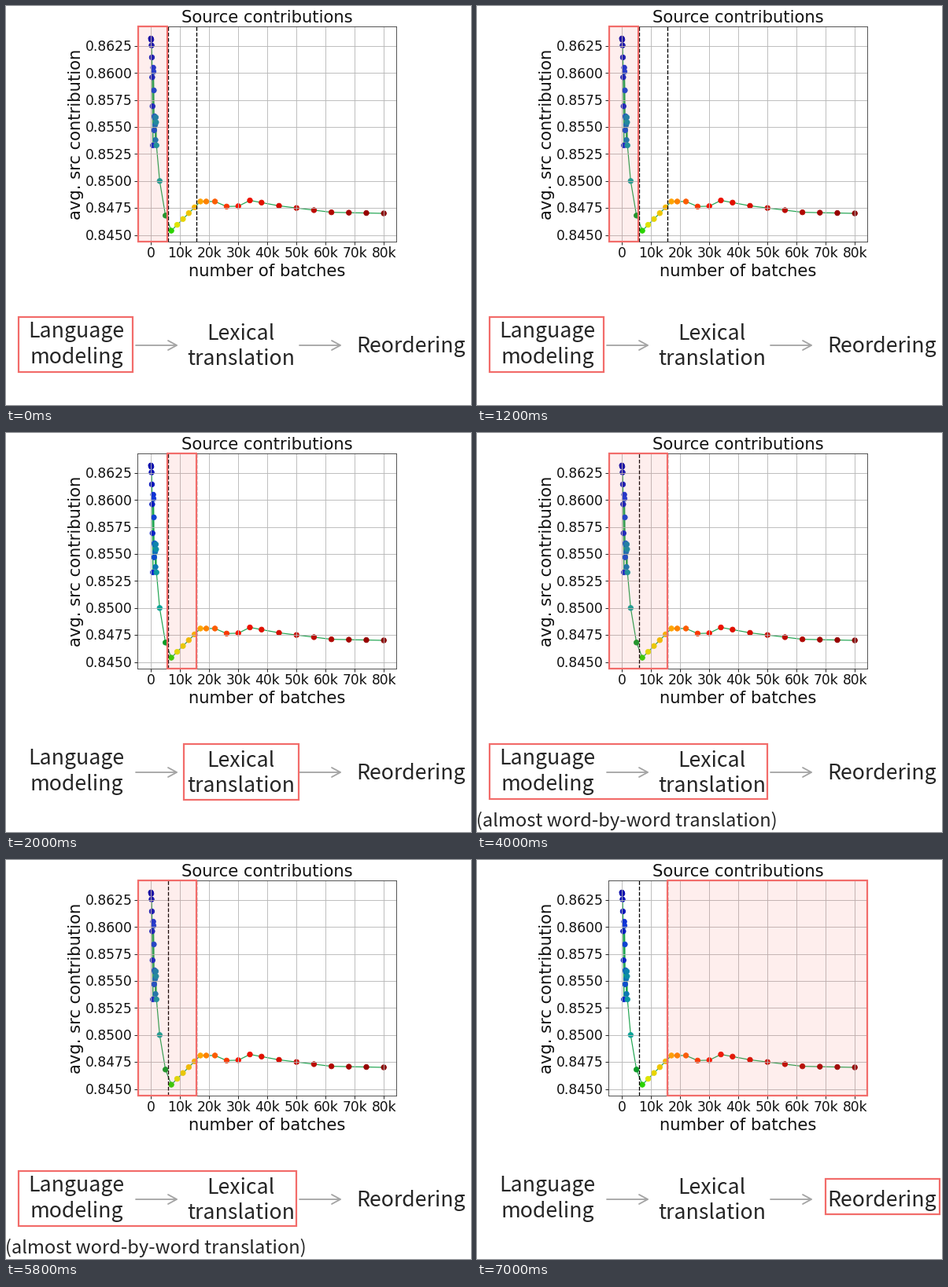
Write a matplotlib script that moves like this. It is 591x508 px and loops after 9000 ms.

```python
import numpy as np
import matplotlib.pyplot as plt
from matplotlib.animation import FuncAnimation
from matplotlib.colors import LinearSegmentedColormap
from matplotlib.patches import Rectangle

W, H, DPI = 591, 508, 100
PT = 72 / DPI  # points per pixel
RED, SHADE, ARROW = "#f26c6a", (0.97, 0.4, 0.38, 0.11), "#a3a3a3"
PLOT, HAND = "DejaVu Sans", "Noto Sans CJK JP"

# Plot area in pixels, measured from the top left
LEFT, RIGHT, TOP, BOTTOM = 167.4, 496.3, 26.1, 300.3
X0, PX_PER_K = 184.2, 3.7
Y0, V0, ROW, STEP = 51, 0.8625, 34.36, 0.0025

# Early checkpoints: passes that fall from high to low in a number of points
PASSES = [(.8632, .8533, 7), (.8605, .8547, 4),
          (.8560, .8538, 4), (.8559, .8533, 3)]
# Later checkpoints follow straight lines between turning points
TURNS = [(3, .85), (5, .8468), (7, .8454), (17, .8481), (22, .8481),
         (28, .8474), (34, .8482), (44, .8477), (62, .8471), (80, .8470)]
COLORS = [(0, "#0000a8"), (8, "#1038d8"), (18, "#0aa39a"), (19, "#0a9a28"),
          (20, "#2ad400"), (21, "#e0e400"), (25, "#ffa500"), (29, "#fa1400"),
          (38, "#8b0000")]

# Each stage: start second, plot span, label box (x0, y0, x1, y1), note shown
STAGES = [
    (0, (168.2, 204.7), (16, 396, 161, 466), False),
    (2, (205.1, 242.3), (226, 395.5, 371.5, 466.5), False),
    (4, (168.2, 242.3), (16, 396, 369, 466), True),
    (7, (242.3, 496), (442.5, 406, 588, 450.5), False),
]

fig = plt.figure(figsize=(W / DPI, H / DPI), dpi=DPI, facecolor="white")


def to_k(x):
    return (x - X0) / PX_PER_K


def to_value(y):
    return V0 - (y - Y0) * STEP / ROW


def contributions():
    early = np.concatenate([high + (low - high) * np.linspace(0, 1, n) ** 2.5
                            for high, low, n in PASSES])
    early_k = np.linspace(0, 1.9, len(early))
    late_k = [*range(3, 20, 2), *range(22, 39, 4), *range(44, 81, 6)]
    late = np.interp(late_k, *zip(*TURNS))
    return np.append(early_k, late_k), np.append(early, late)


def draw_chart():
    ax = fig.add_axes([LEFT / W, 1 - BOTTOM / H,
                       (RIGHT - LEFT) / W, (BOTTOM - TOP) / H])
    ax.set_xlim(to_k(LEFT), to_k(RIGHT))
    ax.set_ylim(to_value(BOTTOM), to_value(TOP))
    ax.set_xticks(np.arange(0, 81, 10))
    ax.set_yticks(V0 - STEP * np.arange(8))
    ax.tick_params(length=3.7 * PT, width=0.85 * PT,
                   labelbottom=False, labelleft=False)
    ax.grid(color="#b8b8b8", lw=0.9 * PT)
    for spine in ax.spines.values():
        spine.set(linewidth=0.9 * PT, edgecolor="#444444")

    k, v = contributions()
    last = len(k) - 1
    cmap = LinearSegmentedColormap.from_list(
        "training", [(i / last, color) for i, color in COLORS], N=1024)
    # Line below the markers, markers below the grid
    ax.plot(k, v, color="#22a552", lw=1.2 * PT, zorder=0.9)
    ax.scatter(k, v, c=np.arange(len(k)), cmap=cmap,
               s=(6.5 * PT) ** 2, linewidths=0.8 * PT, zorder=1)
    for x in (205.5, 242):
        ax.axvline(to_k(x), color="black", lw=1.3 * PT,
                   dashes=(3.7, 1.6), zorder=3)


draw_chart()

# Transparent overlay in pixel units
page = fig.add_axes([0, 0, 1, 1])
page.set(xlim=(0, W), ylim=(H, 0))
page.axis("off")


def label(x, y, text, px=21.2, **kw):
    kw = dict(ha="center", va="baseline", family=PLOT, color="#111111") | kw
    return page.text(x, y, text, fontsize=px * PT, **kw)


def word(x, y, text, px=26.7):
    return label(x, y, text, px, family=HAND, weight="light", color="#262626")


def arrow(x0, x1, y=432):
    style = dict(color=ARROW, lw=1.8 * PT, solid_capstyle="round",
                 solid_joinstyle="miter")
    page.plot([x0, x1], [y, y], **style)
    page.plot([x1 - 11, x1, x1 - 11], [y - 6, y, y + 6], **style)


def red_box(fill):
    box = Rectangle((0, 0), 1, 1, facecolor=fill, edgecolor=RED,
                    lw=2.2 * PT, joinstyle="miter", zorder=5)
    return page.add_patch(box)


def place(box, x0, y0, x1, y1):
    box.set_bounds(x0, y0, x1 - x0, y1 - y0)


label(332, 21.3, "Source contributions")
label(332, 343.5, "number of batches")
label(95, 163, "avg. src contribution", rotation=90, rotation_mode="anchor")
for i in range(9):
    label(X0 + 10 * PX_PER_K * i, 320.3, f"{10 * i}k" if i else "0", 17.1)
for i in range(8):
    label(161, Y0 + ROW * i + 6.2, f"{V0 - STEP * i:.4f}", 17.1, ha="right")

word(89.5, 422.5, "Language")
word(89.5, 455, "modeling")
word(298.5, 425, "Lexical")
word(298.5, 457, "translation")
word(515, 441, "Reordering")
note = word(190, 500.5, "(almost word-by-word translation)", 23.7)
arrow(165, 217)
arrow(373, 425)

span_box = red_box(SHADE)
word_box = red_box("none")


def update(second):
    _, (x0, x1), bounds, noted = [s for s in STAGES if s[0] <= second][-1]
    place(span_box, x0, 26, x1, 300)
    place(word_box, *bounds)
    note.set_visible(noted)
    return span_box, word_box, note


anim = FuncAnimation(fig, update, frames=9, interval=1000,
                     repeat=True, repeat_delay=0)
plt.show()
```
